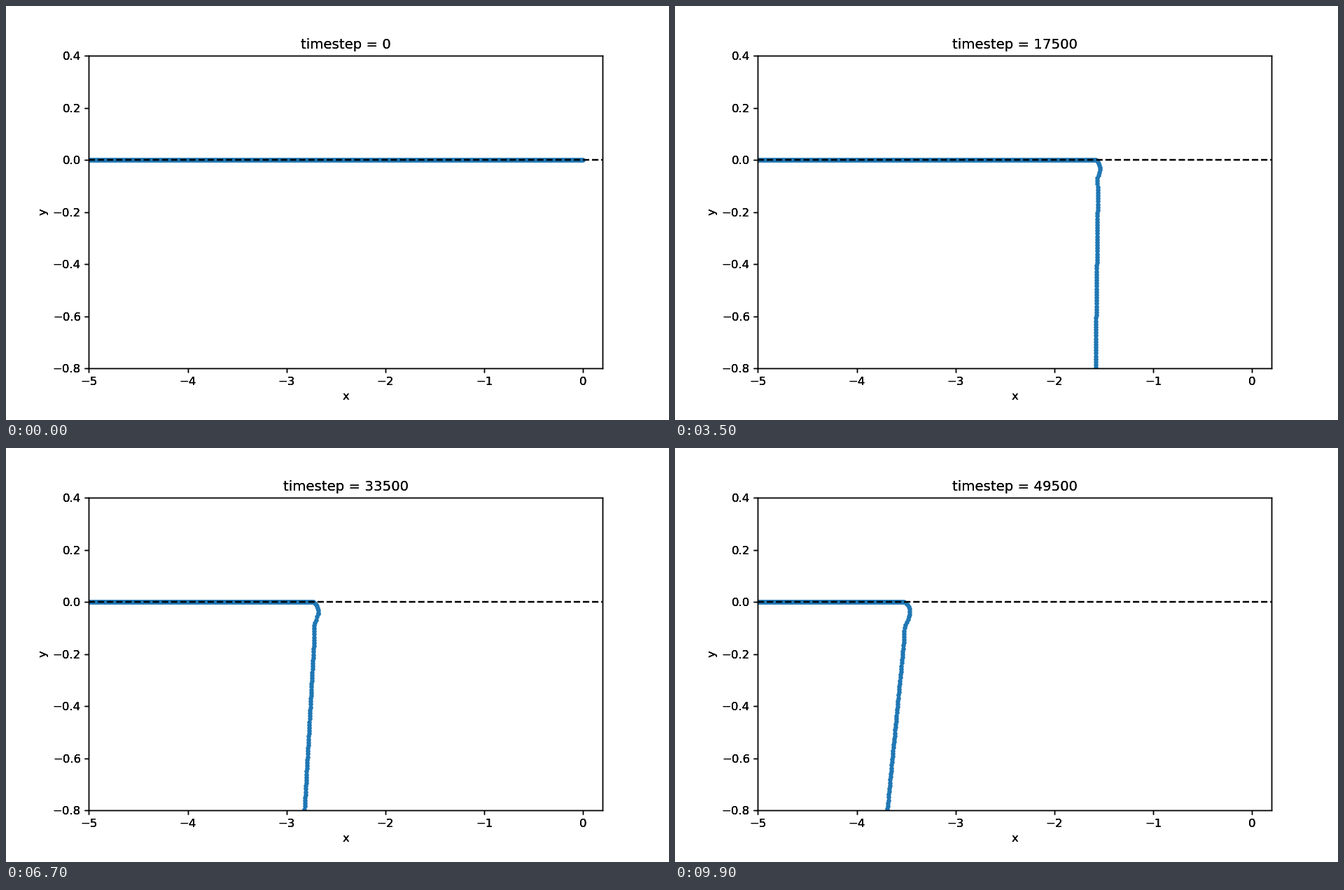
These frames come from a looping animation (947x592 px, 10000 ms). A matplotlib script:

```python
import numpy as np
import matplotlib.pyplot as plt
from matplotlib.animation import FuncAnimation

FRAMES = 100
STEPS = 500          # simulation steps per frame
PX, PY = 1 / 141.1, 1 / 372.5   # one pixel in data units
FLAT, HANG = 0.01, 0.0112       # bead spacing on the table and below it

# Position of the peeling front over time
KEYS = [0, 12, 25, 46, 59, 76, 99]
FRONT = [0, -0.535, -1.127, -1.988, -2.445, -2.964, -3.484]
front = np.poly1d(np.polyfit(np.array(KEYS) / 99, FRONT, 5))


def chain(i):
    """Bead coordinates: flat part, rounded corner, hanging part."""
    grow = min(1, i / 4)
    x0 = front(i / 99) if i else 0.0
    bulge = (1.5 + 0.03 * i) * grow
    width = (5 + 0.07 * i) * grow
    wave = 28 + 0.3 * i
    turn = 12 + 0.06 * i
    lean = 0.0035 * max(0, i - 25)
    tip = 0.05 * i

    edge = x0 + (bulge - width) * PX
    flat = np.arange(-5, edge, FLAT)

    a = np.linspace(0, np.pi / 2, 8)
    corner_d = turn * (1 - np.cos(a))
    corner_x = bulge - width * (1 - np.sin(a))
    keep = corner_d * PY <= tip
    corner_d, corner_x = corner_d[keep], corner_x[keep]

    hang_d = np.arange(tip, turn * PY, -HANG) / PY
    s = hang_d - turn
    hang_x = bulge * np.exp(-(s / 14) ** 2 / 2) * np.cos(2 * np.pi * s / wave)

    d = np.r_[corner_d, hang_d] * PY
    x = x0 + np.r_[corner_x, hang_x] * PX - lean * d
    return np.r_[flat, x], np.r_[np.zeros_like(flat), -d]


def style(ax):
    ax.set_xlim(-5, 0.2)
    ax.set_ylim(-0.8, 0.4)
    ax.set_xlabel("x")
    ax.set_ylabel("y")


plt.rcParams["font.family"] = "DejaVu Sans"
fig = plt.figure(figsize=(9.47 / 1.184, 5.92 / 1.184), dpi=118.4)
fig.subplots_adjust(left=0.125, right=0.9, bottom=0.125, top=0.88)
ax = fig.add_subplot()
style(ax)
beads, = ax.plot([], [], ".", color="C0")
ax.plot([-5, 0.2], [0, 0], "k--")

# Repeated passes over the axes give the text its heavier edges
layers = [ax]
for _ in range(2):
    over = fig.add_axes(ax.get_position())
    over.patch.set_visible(False)
    style(over)
    layers.append(over)
titles = [layer.set_title("") for layer in layers[:2]]


def update(i):
    beads.set_data(*chain(i))
    for title in titles:
        title.set_text(f"timestep = {i * STEPS}")
    return beads, *titles


anim = FuncAnimation(fig, update, frames=FRAMES, interval=100,
                     repeat=True, repeat_delay=0)
plt.show()
```
